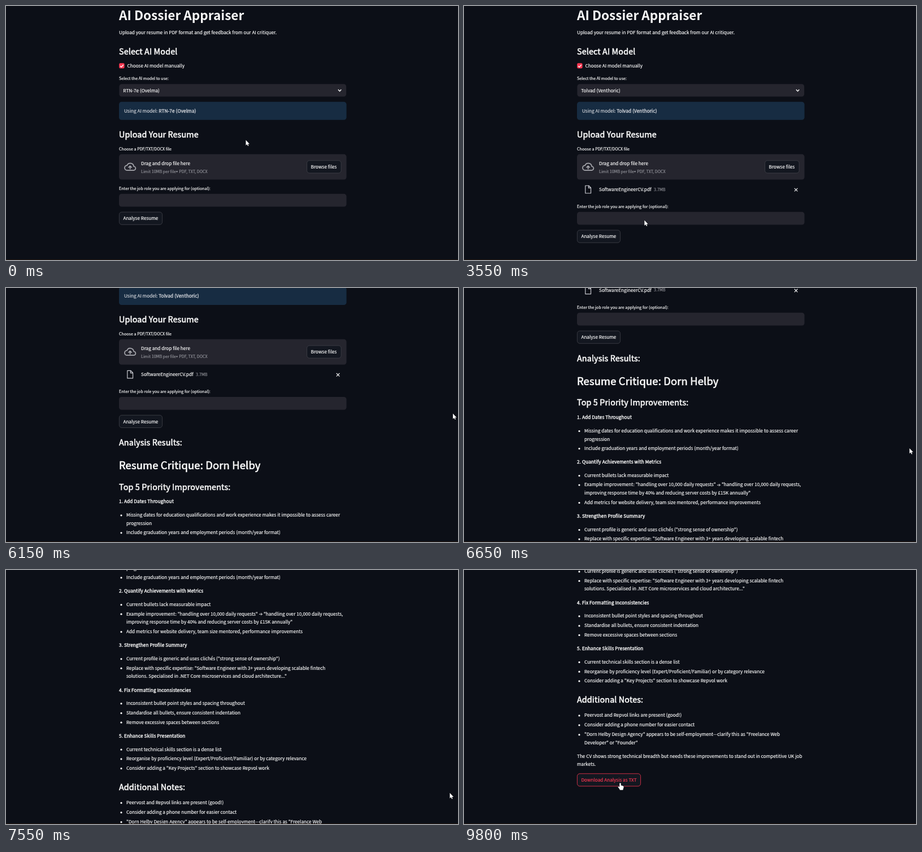
These frames come from a looping animation (800x450 px, 9850 ms). An HTML page with a canvas:

```html
<!DOCTYPE html>
<html lang="en">
<head>
<meta charset="utf-8">
<title>Resume feedback demo</title>
<style>
  html, body { margin: 0; width: 100%; height: 100%; overflow: hidden; background: #0c0f17; }
  canvas { display: block; width: 800px; height: 450px; }
</style>
</head>
<body>
<canvas id="stage" width="800" height="450"></canvas>
<script>
const ctx = document.getElementById('stage').getContext('2d');
const LOOP = 9850;
const FONT = '"Noto Sans CJK JP", "Noto Sans CJK SC", "Noto Sans CJK", "Open Sans", sans-serif';
const BG = '#0c0f17', PANEL = '#25252e', WHITE = '#fafafa', RED = '#fa3650', GREY = '#909198';
const BODY = 8.2, SMALL = 7.17, HEAD = 14.35, BIG = 18.4, TITLE = 22.55;
const MODELS = ['RTN-7e (Ovelma)', 'Tolvad (Venthoric)'];

// Moments of the story, in ms
const OPEN = 750, PICK = 1400, PRESS = 2150, RELEASE = 2300, UPLOAD = 2600,
      LEAVE = 3080, RUN = 4000, DONE = 5600;

const smooth = u => u * u * (3 - 2 * u);

// Value at time t along [time, ...values] keys
function along(t, keys, ease = u => u) {
  if (t <= keys[0][0]) return keys[0].slice(1);
  for (let i = 1; i < keys.length; i++) {
    const a = keys[i - 1], b = keys[i];
    if (t <= b[0]) {
      const u = ease((t - a[0]) / (b[0] - a[0]));
      return a.slice(1).map((v, k) => v + (b[k + 1] - v) * u);
    }
  }
  return keys[keys.length - 1].slice(1);
}

const MOUSE_FORM = [
  [100, 424.5, 237.5], [650, 432, 148], [800, 432, 148], [1250, 270, 199],
  [1450, 270, 199], [2000, 564.5, 281], [3000, 564.5, 281], [3800, 246, 409],
  [4150, 246, 409], [4800, 306, 408]
];
const MOUSE_SCROLL = [[5600, 791, 156], [6150, 791, 222.4], [7150, 786, 345.2], [8000, 785, 451], [8060, 785, 458]];
const MOUSE_END = [[8450, 633, 450], [9400, 276.5, 377]];
const SCROLL = [[5620, 0], [6150, 171.5], [7150, 470], [8000, 728.5], [8060, 746.7]];

// Text placed by the middle of its capitals; a thin outline sets the weight
function text(str, x, mid, size = BODY, color = WHITE, weight = 400) {
  const semi = weight === 600;
  const tracking = semi ? (size > 10 ? 0.008 : 0.013) * size : 0;
  ctx.font = `${weight === 700 ? 700 : 400} ${size}px ${FONT}`;
  ctx.letterSpacing = tracking.toFixed(3) + 'px';
  ctx.fillStyle = ctx.strokeStyle = color;
  ctx.lineJoin = 'round';
  ctx.lineWidth = semi ? 0.15 + size * 0.03 : 0.18;
  const y = mid + size * 0.3665;
  ctx.fillText(str, x, y);
  if (weight < 700) ctx.strokeText(str, x, y);
}
const bold = (str, x, mid, size = BODY, color = WHITE) => text(str, x, mid, size, color, 600);

function box(x, y, w, h, fill, stroke, r = 4.6) {
  ctx.beginPath();
  ctx.roundRect(x, y, w, h, r);
  if (fill) { ctx.fillStyle = fill; ctx.fill(); }
  if (stroke) { ctx.strokeStyle = stroke; ctx.lineWidth = 0.8; ctx.stroke(); }
}

function button(label, x, y, w, state) {
  const looks = {
    idle: ['#131720', '#42434b', WHITE],
    hover: ['#131720', RED, RED],
    down: [RED, RED, '#fbe3e6']
  };
  const [fill, line, ink] = looks[state];
  box(x + 0.4, y + 0.4, w - 0.8, 22.2, fill, line);
  text(label, x + 7.4, y + 11.6, BODY, ink);
}

function icon(d, x, y, scale, color, width) {
  ctx.save();
  ctx.translate(x, y);
  ctx.scale(scale, scale);
  ctx.strokeStyle = color;
  ctx.lineWidth = width;
  ctx.stroke(new Path2D(d));
  ctx.restore();
}

function dot(x, y, r, color) {
  ctx.fillStyle = color;
  ctx.beginPath();
  ctx.arc(x, y, r, 0, 7);
  ctx.fill();
}

function modelSection(t) {
  const model = MODELS[t < PICK ? 0 : 1];
  const focus = t >= OPEN - 50 && t < RELEASE;
  text('AI Dossier Appraiser', 200, 16.4, TITLE, WHITE, 700);
  text('Upload your resume in PDF format and get feedback from our AI critiquer.', 200, 47.4);
  bold('Select AI Model', 200, 80.9, HEAD);
  box(200.2, 101.2, 9.4, 9.4, RED, null, 2);
  icon('M0 0l2 2 3.6-4', 202.1, 106.3, 1, WHITE, 1.3);
  text('Choose AI model manually', 214.5, 106);
  text('Select the AI model to use:', 200, 128.8, SMALL);
  box(200.4, 138.2, 401.8, 22.4, PANEL, focus ? '#8c2a3f' : null);
  text(model, 207.3, 149.5);
  icon('M-2.7-1.4L0 1.4 2.7-1.4', 590.6, 149.5, 1, WHITE, 1.4);
  box(200, 169.8, 402.6, 32, '#172c42');
  const ink = '#cfd2d8';
  text('Using AI model: ', 209, 186, BODY, ink);
  bold(model, 270.2, 186, BODY, ink);
}

function uploadSection(t) {
  const browse = t < 1950 || t > LEAVE ? 'idle' : t > PRESS && t < RELEASE ? 'down' : 'hover';
  const loaded = t >= UPLOAD;
  const dy = loaded ? 32 : 0;
  bold('Upload Your Resume', 200, 228, HEAD);
  text('Choose a PDF/TXT/DOCX file', 200, 253, SMALL);
  box(200, 262.6, 402.6, 45, PANEL);
  icon('M6 19h13a4 4 0 0 0 .4-8A7.1 7.1 0 0 0 5.8 9A5 5 0 0 0 6 19zM12 17v-6M8.6 13.6L12 10.2l3.4 3.4',
    209.2, 274.5, 0.87, '#a6a7ad', 2);
  text('Drag and drop file here', 239, 279);
  text('Limit 10MB per file', 239, 293, SMALL, GREY);
  dot(302.6, 293.2, 1.2, GREY);
  text('PDF, TXT, DOCX', 306.2, 293, SMALL, GREY);
  button('Browse files', 532.2, 273.4, 61.4, browse);
  if (loaded) {
    icon('M6 3h8l5 5v13H6zM13.5 3v5.5H19', 210.3, 316, 0.75, '#c9cad0', 1.6);
    text('SoftwareEngineerCV.pdf', 239, 324.6);
    text('3.7MB', 336, 324.9, SMALL, GREY);
    icon('M-2.8-2.8L2.8 2.8M2.8-2.8L-2.8 2.8', 587.6, 325.6, 1, WHITE, 1.1);
  }
  text('Enter the job role you are applying for (optional):', 200, 323.2 + dy, SMALL);
  box(200, 332.8 + dy, 402.6, 22.8, PANEL);
  const run = t < 3650 || t >= DONE ? 'idle' : t > RUN - 50 && t < RUN + 100 ? 'down' : 'hover';
  button('Analyse Resume', 200, 364.7 + dy, 77, run);
}

function menu() {
  box(200.4, 163, 401.8, 55, BG, '#2b2c35');
  box(200.8, 190.5, 401, 23, PANEL, null, 0);
  MODELS.forEach((m, i) => text(m, 207.3, 179 + i * 23));
}

function spinner(t) {
  const a = Math.min(t, 5400) / 750 * Math.PI * 2;
  const ring = (from, to, color) => {
    ctx.strokeStyle = color;
    ctx.beginPath();
    ctx.arc(206.4, 436, 5.4, from, to);
    ctx.stroke();
  };
  ctx.lineWidth = 1.5;
  ring(0, Math.PI * 2, '#5b606b');
  ring(a, a + Math.PI / 2, '#1f3a57');
  text('Getting AI feedback...', 217, 436);
}

const TIPS = [
  ['1. Add Dates Throughout', 549.7],
  ['2. Quantify Achievements with Metrics', 629.2],
  ['3. Strengthen Profile Summary', 725.2],
  ['4. Fix Formatting Inconsistencies', 804.7],
  ['5. Enhance Skills Presentation', 885.7]
];
const BULLETS = [
  [574, 'Missing dates for education qualifications and work experience makes it impossible to assess career', 'progression'],
  [605, 'Include graduation years and employment periods (month/year format)'],
  [653, 'Current bullets lack measurable impact'],
  [669.5, 'Example improvement: "handling over 10,000 daily requests"', 'improving response time by 40% and reducing server costs by £15K annually"'],
  [701, 'Add metrics for website delivery, team size mentored, performance improvements'],
  [749, 'Current profile is generic and uses clichés ("strong sense of ownership")'],
  [765.5, 'Replace with specific expertise: "Software Engineer with 3+ years developing scalable fintech', 'solutions. Specialised in .NET Core microservices and cloud architecture..."'],
  [828, 'Inconsistent bullet point styles and spacing throughout'],
  [845, 'Standardise all bullets, ensure consistent indentation'],
  [861.5, 'Remove excessive spaces between sections'],
  [909.5, 'Current technical skills section is a dense list'],
  [926.3, 'Reorganise by proficiency level (Expert/Proficient/Familiar) or by category relevance'],
  [943, 'Consider adding a "Key Projects" section to showcase Repvol work'],
  [1004, 'Peervost and Repvol links are present (good!)'],
  [1021, 'Consider adding a phone number for easier contact'],
  [1038, '"Dorn Helby Design Agency" appears to be self-employment—clarify this as "Freelance Web', 'Developer" or "Founder"']
];

function results(t) {
  bold('Analysis Results:', 200, 445.6, HEAD);
  bold('Resume Critique: Dorn Helby', 200, 486.2, BIG);
  bold('Top 5 Priority Improvements:', 200, 524.2, HEAD);
  for (const [tip, y] of TIPS) bold(tip, 200, y);
  for (const [y, first, second] of BULLETS) {
    dot(204, y + 0.6, 1.6, WHITE);
    text(first, 213, y);
    if (second) text(second, 213, y + 14.6);
  }
  icon('M0 0h5.4M3.2-2.2L5.4 0 3.2 2.2', 448, 670.2, 1, WHITE, 0.9);
  text('"handling over 10,000 daily requests,', 455.9, 669.5);
  bold('Additional Notes:', 200, 976.8, HEAD);
  text('The CV shows strong technical breadth but needs these improvements to stand out in competitive UK job', 200, 1076.3);
  text('markets.', 200, 1091);
  button('Download Analysis as TXT', 200, 1107.1, 113, t > 9130 ? 'hover' : 'idle');
}

const ARROW = new Path2D('M0 0V9.4L2.1 7.4 3.6 10.6 5 10 3.6 6.9H6.5Z');
const HAND = new Path2D('M-1.2 1.1Q0-.8 1.2 1.1V4.6L4.8 5.4Q6.4 5.8 6.2 7.6L5.4 10.6 4.8 12.8H-.6L-1.3 11-4 7.6Q-3.8 6-2.4 6.8L-1.2 7.8Z');

function mouse(t) {
  if (t > 8060 && t < 8450) return;
  const [x, y] = t < DONE ? along(t, MOUSE_FORM, smooth)
    : t < 8400 ? along(t, MOUSE_SCROLL)
    : along(t, MOUSE_END, smooth);
  const hand = (t > 520 && t < 1600) || (t > 1900 && t < LEAVE) || (t > 3650 && t < 4350) || t > 9130;
  const shape = hand ? HAND : ARROW;
  ctx.save();
  ctx.translate(x, y);
  ctx.strokeStyle = '#101218';
  ctx.lineWidth = 1.2;
  ctx.lineJoin = 'round';
  ctx.stroke(shape);
  ctx.fillStyle = '#ffffff';
  ctx.fill(shape);
  ctx.restore();
}

function draw(t) {
  ctx.fillStyle = BG;
  ctx.fillRect(0, 0, 800, 450);
  ctx.save();
  ctx.translate(0, -along(t, SCROLL)[0]);
  modelSection(t);
  uploadSection(t);
  if (t >= OPEN && t < PICK) menu();
  if (t >= RUN + 100 && t < DONE) spinner(t);
  if (t >= DONE) results(t);
  ctx.restore();
  mouse(t);
  ctx.fillStyle = '#22160f';
  ctx.fillRect(0, 449, 800, 1);
}

const start = performance.now();
function tick() {
  draw((performance.now() - start) % LOOP);
  requestAnimationFrame(tick);
}
tick();
</script>
</body>
</html>
```
